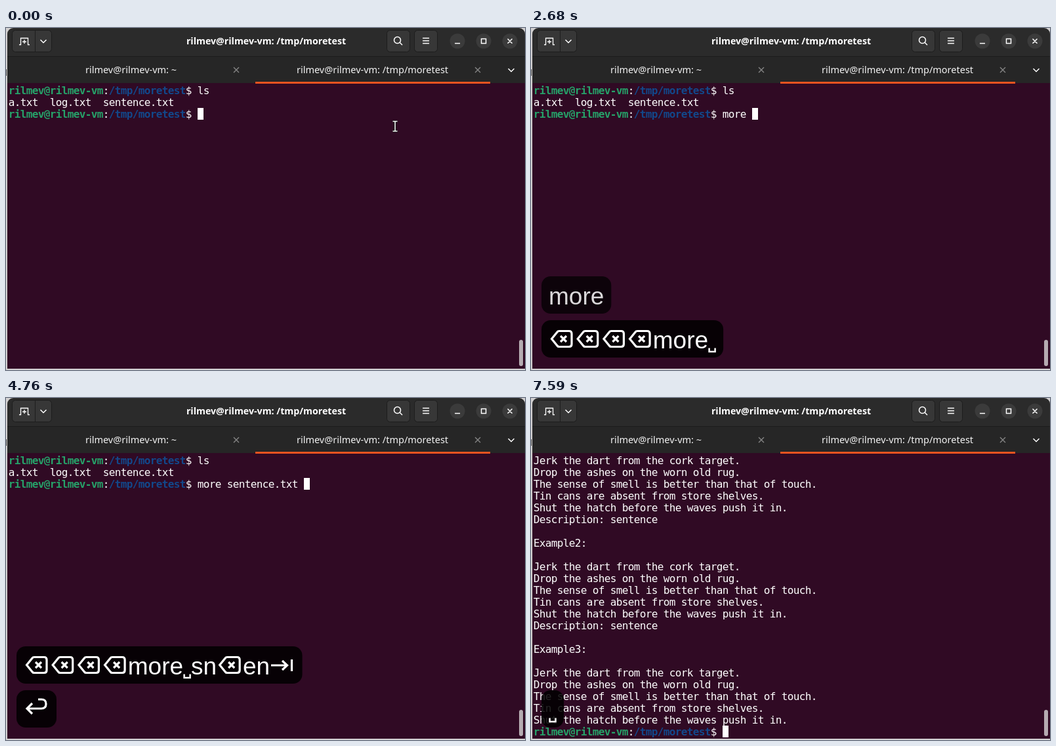
These frames come from a looping animation (791 px wide and 522 px high, 8000 ms). An HTML page with a canvas:

```html
<!DOCTYPE html>
<html lang="en">
<head>
<meta charset="utf-8">
<title>Terminal</title>
<style>
html, body { margin: 0; width: 100%; height: 100%; overflow: hidden; }
canvas { display: block; }
</style>
</head>
<body>
<canvas id="stage" width="791" height="522"></canvas>
<script>
const ctx = document.getElementById('stage').getContext('2d');
const LOOP = 8000, ROW = 18, COL = 9, TOP = 86, LEFT = 4;
const MONO = '16px "DejaVu Sans Mono", monospace', TRACKING = '-0.633px';
const UI = '"Noto Sans", sans-serif';
const BIG = '37px "Liberation Sans", sans-serif';
const BG = '#300a24';
const USER = 'rilmev@rilmev-vm', DIR = '/tmp/moretest';

// Typed keys: < backspace, _ space, > tab, ! return
const panels = [
  { keys: 'more', times: [300, 450, 590, 740], fade: [[2680, .85], [2830, .35], [2980, 0]] },
  { keys: '<<<<more_sn<en>',
    times: [1340, 1490, 1640, 1790, 1940, 2090, 2230, 2230, 2680, 3120, 3270, 3560, 3710, 3860, 4010],
    fade: [[5950, .68], [6100, 0]] },
  { keys: '!', times: [4760], fade: [[6850, .5], [7000, 0]] },
  { keys: '_', times: [7440], fade: [] }
];
const OPEN = 4910, NEXT_PAGE = 7590;

// Key symbols, relative to the left edge and the text baseline
const icons = {
  '<': { width: 39.7, path: 'M4.500 -14L13 -24.500Q14 -26 16 -26H31Q35 -26 35 -22V-6Q35 -2 31 -2H16Q14 -2 13 -3.500ZM18 -18.500L27 -9.500M27 -18.500L18 -9.500' },
  '_': { width: 12, path: 'M1.500 0V5.500H10.500V0' },
  '>': { width: 38.5, path: 'M2 -13.500H26M19 -20.500L26.500 -13.500L19 -6.500M33.500 -22.500V-4.500' },
  '!': { width: 39, path: 'M6 -14.500H27Q34 -14.500 34 -21.500Q34 -28.500 27 -28.500H22M13 -22.500L5 -14.500L13 -6.500' }
};

const article = [1, 2, 3].flatMap(n => [
  'Description: sentence', '', `Example${n}:`, '',
  'Jerk the dart from the cork target.',
  'Drop the ashes on the worn old rug.',
  'The sense of smell is better than that of touch.',
  'Tin cans are absent from store shelves.',
  'Shut the hatch before the waves push it in.'
]);

function rect(x, y, w, h, color) {
  ctx.fillStyle = color;
  ctx.fillRect(x, y, w, h);
}

function round(x, y, w, h, r, fill, border) {
  ctx.beginPath();
  ctx.roundRect(x, y, w, h, r);
  ctx.fillStyle = fill;
  ctx.fill();
  if (border) {
    ctx.strokeStyle = border;
    ctx.lineWidth = 1;
    ctx.stroke();
  }
}

function line(d, color = '#fff', width = 1.5, x = 0, y = 0) {
  ctx.save();
  ctx.translate(x, y);
  ctx.strokeStyle = color;
  ctx.lineWidth = width;
  ctx.stroke(new Path2D(d));
  ctx.restore();
}

function label(str, x, y, font, color = '#fff', align = 'left') {
  ctx.font = font;
  ctx.fillStyle = color;
  ctx.textAlign = align;
  ctx.fillText(str, x, y);
}

function drawWindow() {
  rect(0, 0, 791, 522, '#d2d0d1');
  rect(0, 63, 1, 10, '#444');
  round(2, 0, 789, 520, [9, 9, 0, 0], '#2b2b2b');
  rect(2, 43, 789, 41, '#262626');
  rect(2, 43, 789, 1, '#1c1c1c');
  rect(2, 84, 789, 436, BG);
  rect(380, 82, 358, 3, '#e95420');

  const face = '#373737', edge = '#1d1d1d';
  round(9.5, 3.5, 60, 33, 5, face, edge);
  line('M44.500 4V36', edge, 1);
  line('M20 25.500H22.500V15.500H33.500V25.500H36M28 18V24M25 21H31', '#fff', 1.3);
  line('M52.500 18L57 22.500L61.500 18');
  round(580.5, 3.5, 35, 33, 5, face, edge);
  line('M601.500 18.500A5 5 0 1 1 591.500 18.500A5 5 0 1 1 601.500 18.500M600 22L604 26');
  round(622.5, 3.5, 35, 33, 5, face, edge);
  line('M635 15.500H645M635 19.500H645M635 23.500H645');
  for (const x of [688, 728, 768]) round(x - 11.5, 8.5, 23, 23, 11.5, '#3b3b3b');
  line('M684 23.500H692M724.500 16.500H731.500V23.500H724.500ZM764.500 16.500L771.500 23.500M771.500 16.500L764.500 23.500');

  label(`${USER}: ${DIR}`, 396.5, 25, `bold 14.2px ${UI}`, '#fff', 'center');
  label(`${USER}: ~`, 190.5, 69, `14.5px ${UI}`, '#f2f2f2', 'center');
  label(`${USER}: ${DIR}`, 558.5, 69, `14.5px ${UI}`, '#f2f2f2', 'center');
  for (const x of [351, 719]) line('M-4 -4L4 4M4 -4L-4 4', '#858585', 1.4, x, 64);
  line('M765.500 62L770 66.500L774.500 62');
}

function write(str, row, col = 0, color = '#fff', weight = '') {
  ctx.letterSpacing = TRACKING;
  label(str, LEFT - .3 + col * COL, TOP + row * ROW + 15, `${weight} ${MONO}`, color);
  ctx.letterSpacing = '0px';
}

function prompt(row, command, cursor) {
  write(USER, row, 0, '#26a269', 'bold');
  write(':', row, 16);
  write(DIR, row, 17, '#12488b', 'bold');
  write('$ ' + command, row, 30);
  if (cursor) rect(LEFT + (32 + command.length) * COL, TOP + row * ROW, COL, ROW, '#fff');
}

const typed = (panel, t) => panel.keys.slice(0, panel.times.filter(x => x <= t).length);

function commandAt(t) {
  let command = '';
  for (const key of typed(panels[0], t) + typed(panels[1], t)) {
    if (key === '<') command = command.slice(0, -1);
    else if (key === '>') command = 'more sentence.txt ';
    else command += key === '_' ? ' ' : key;
  }
  return command;
}

function drawTerminal(t) {
  if (t < OPEN) {
    prompt(0, 'ls');
    write('a.txt  log.txt  sentence.txt', 1);
    prompt(2, commandAt(t), true);
    return;
  }
  const first = t < NEXT_PAGE ? 0 : 4;
  article.slice(first, first + 23).forEach((str, row) => write(str, row));
  if (first) {
    prompt(23, '', true);
  } else {
    rect(LEFT, TOP + 23 * ROW, 14 * COL, ROW, '#fff');
    write('--More--(76%)', 23, 0, BG);
  }
}

function drawPanel(panel, i, t) {
  const keys = typed(panel, t);
  if (!keys) return;
  const step = panel.fade.filter(f => f[0] <= t).pop();
  const next = panels[i + 1];
  const y = next && next.times[0] <= t ? 379 : 446;
  ctx.font = BIG;
  const widths = [...keys].map(k => icons[k] ? icons[k].width : ctx.measureText(k).width);
  ctx.globalAlpha = step ? step[1] : 1;
  round(16, y, 22 + widths.reduce((a, b) => a + b), 57, 14, 'rgba(0,0,0,.86)');
  let x = 27;
  [...keys].forEach((key, k) => {
    if (icons[key]) line(icons[key].path, '#fff', key === '_' ? 2.5 : 3.2, x, y + 42.5);
    else label(key, x, y + 43, BIG);
    x += widths[k];
  });
  ctx.globalAlpha = 1;
}

function drawPointer() {
  const beam = 'M589.500 142.500H596.500M589.500 157.500H596.500M593 142.500V157.500';
  line(beam, '#111', 3.5);
  line(beam, '#fff', 1.5);
}

function frame(now) {
  const t = now % LOOP;
  drawWindow();
  drawTerminal(t);
  round(782, 476, 6, 40, 3, '#b5abb1');
  panels.forEach((panel, i) => drawPanel(panel, i, t));
  if (t < 300) drawPointer();
  requestAnimationFrame(frame);
}
requestAnimationFrame(frame);
</script>
</body>
</html>
```
